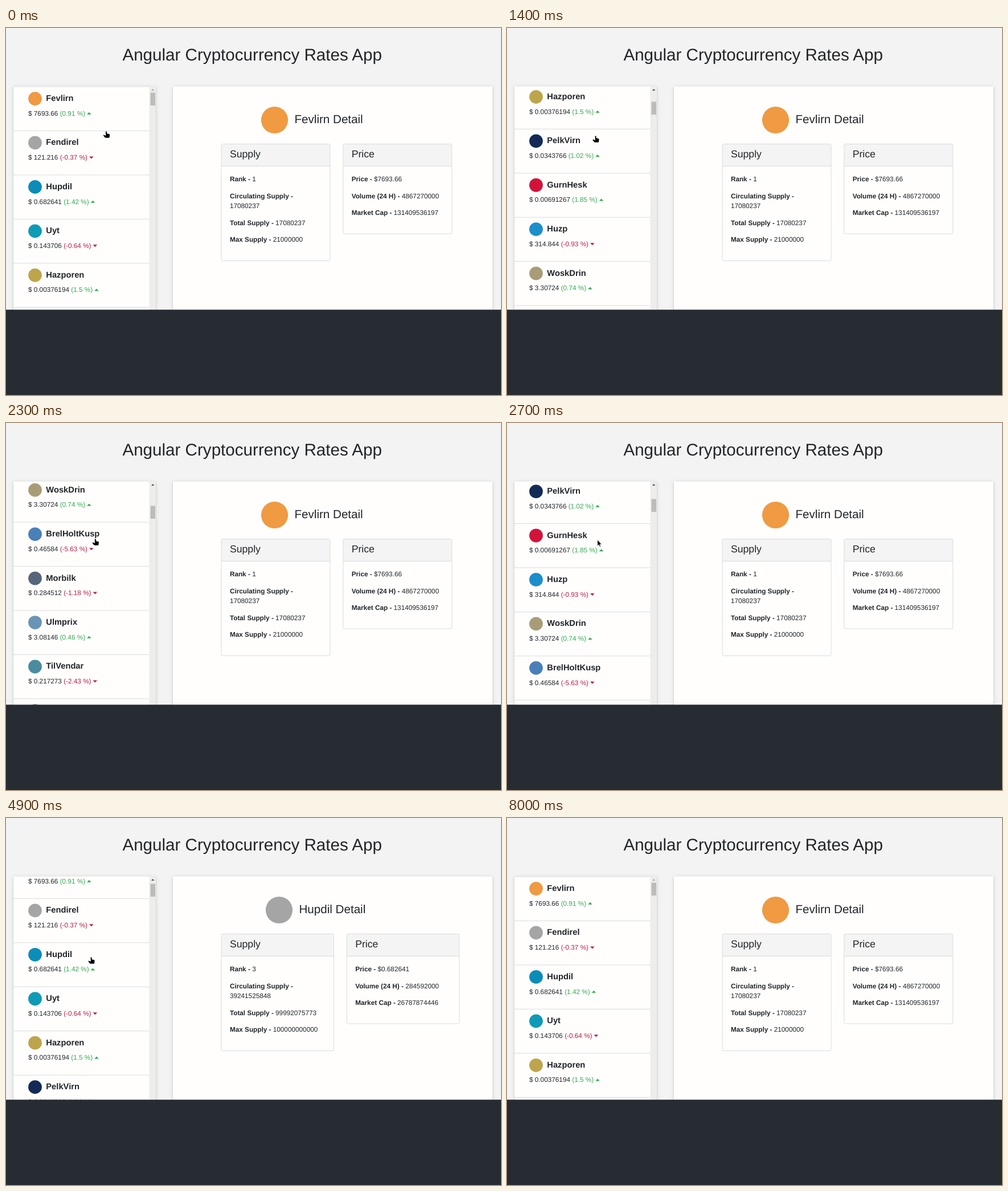
Recreate the animation shown at these times as an HTML page. Size 869 px wide and 644 px high, loop 8600 ms.

```html
<!DOCTYPE html>
<html lang="en">
<head>
<meta charset="utf-8">
<title>Cryptocurrency Rates</title>
<style>
  html, body { margin: 0; width: 100%; height: 100%; overflow: hidden; background: #f4f3f3; }
  svg { display: block; width: 869px; height: 644px; }
  text {
    font: 11.776px "Liberation Sans", Arial, sans-serif;
    fill: #212529; white-space: pre; text-rendering: geometricPrecision;
  }
  text.title { font-size: 29.6px; }
  text.heading { font-size: 20.6px; }
  text.card { font-size: 17.66px; }
  text.name { font-size: 14.72px; font-weight: bold; }
  .bold { font-weight: bold; }
  .up { fill: #32ab50; }
  .down { fill: #b81d47; }
  .panel {
    fill: #fffefd;
    filter: drop-shadow(0 1.5px 1.8px rgba(0, 0, 0, .15)) drop-shadow(0 1.5px 3.6px rgba(0, 0, 0, .1));
  }
  .line { stroke: #dcdcdc; fill: none; }
</style>
</head>
<body>
<svg id="stage" viewBox="0 0 869 644">
  <clipPath id="listClip"><rect x="13" y="102.5" width="250" height="392"/></clipPath>
  <rect width="869" height="644" fill="#f4f3f3"/>
  <text class="title" x="204.4" y="56.8">Angular Cryptocurrency Rates App</text>
  <rect class="panel" x="13" y="102.5" width="250" height="420"/>
  <rect class="panel" x="293" y="102.5" width="561" height="420"/>
  <g clip-path="url(#listClip)">
    <g id="list"></g>
    <rect x="251.5" y="102" width="12" height="393" fill="#ededec"/>
    <path id="scrollArrow" d="M255 109.8l2.7-2.9 2.7 2.9z"/>
    <rect id="thumb" x="253.5" width="8.5" height="22.5" fill="#bcbcba"/>
  </g>
  <g id="detail"></g>
  <rect y="494.3" width="869" height="150" fill="#272c33"/>
  <g id="cursor" stroke="#fff" stroke-width=".7" stroke-linejoin="round">
    <path id="hand" d="M-1.3 1Q-1.2 0 0 0T1.3 1L1.7 4 5.4 4.8Q6.6 5.2 6.4 7L5.8 12H-2L-5.2 8Q-6 6.2-4.4 6.3L-1 7.4Z"/>
    <path id="arrow" d="M2 2V12.8L4.4 10.6 6 14.2 7.8 13.4 6.2 9.9H9.4Z"/>
  </g>
</svg>
<script>
const LOOP = 8600, TICK = 100, ROW = 77.45, NOTCH = 39.12;

// name, price, change in percent, icon colour
const coins = [
  ['Fevlirn', '7693.66', 0.91, '#f09a42'],
  ['Fendirel', '121.216', -0.37, '#a5a5a5'],
  ['Hupdil', '0.682641', 1.42, '#0b8db8'],
  ['Uyt', '0.143706', -0.64, '#0f9ab5'],
  ['Hazporen', '0.00376194', 1.5, '#bda54c'],
  ['PelkVirn', '0.0343766', 1.02, '#122a55'],
  ['GurnHesk', '0.00691267', 1.85, '#d3123a'],
  ['Huzp', '314.844', -0.93, '#1c8ecb'],
  ['WoskDrin', '3.30724', 0.74, '#a89c78'],
  ['BrelHoltKusp', '0.46584', -5.63, '#4a80b8'],
  ['Morbilk', '0.284512', -1.18, '#56657a'],
  ['Ulmprix', '3.08146', 0.46, '#6a94b4'],
  ['TilVendar', '0.217273', -2.43, '#4a8c9e'],
  ['Zelvirt', '0.300028', 2.67, '#8c9290'],
  ['Kasbrin', '0.330295', -1.35, '#2a80b5'],
  ['Zonre', '0.0388709', -0.57, '#1a9fba'],
  ['Duvos', '2.44907', -6.72, '#5a9fd4'],
  ['Pobrisk', '1.52318', -2.04, '#2bab78']
];

// icon centre x and card width, then the figures shown in the cards
const details = [
  { iconX: 471.5, width: 191, rank: 1, supply: '17080237', total: '17080237', max: '21000000', volume: '4867270000', cap: '131409536197' },
  { iconX: 463.5, width: 187, rank: 6, supply: '56838817', total: '56838817', max: '84000000', volume: '301255000', cap: '6889774042' },
  { iconX: 479.5, width: 197.5, rank: 3, supply: '39241525848', total: '99992075773', max: '100000000000', volume: '284592000', cap: '26787874446' },
  { iconX: 480.5, width: 184, rank: 97, supply: '998999942', total: '998999942', max: '1000000000', volume: '5316140', cap: '143562286' }
];

// time followed by values
const scrollKeys = [[400, 0], [1000, 4], [1200, 7], [1300, 7], [1500, 9], [1600, 9], [1900, 24],
  [2500, 12], [2700, 10], [2800, 10], [3300, 1], [6100, 1], [6300, .28], [6400, 0]];
const cursorKeys = [[400, 176, 181], [1000, 155.5, 189], [1600, 155.5, 189], [1900, 156.8, 203],
  [2800, 156.8, 203], [3300, 152, 183], [3400, 152, 183], [3800, 130, 168], [4000, 131, 169],
  [4400, 151, 239], [4500, 151, 239], [4700, 149.5, 244], [5000, 149.5, 244], [5300, 139, 338],
  [5600, 139, 338], [6300, 139.5, 204.5], [6400, 135.5, 190], [6700, 111.5, 139],
  [7000, 111.5, 139], [7800, 92, 41], [7900, 71, 24]];
const selectionKeys = [[0, 0], [4000, 1], [4900, 2], [5600, 3], [7000, 0]];
const ICON_DELAY = 200;

const byId = id => document.getElementById(id);

function add(parent, tag, attributes, content = '') {
  const node = document.createElementNS('http://www.w3.org/2000/svg', tag);
  for (const key in attributes) node.setAttribute(key, attributes[key]);
  node.textContent = content;
  return parent.appendChild(node);
}

const addText = (parent, x, y, content, className = '') =>
  add(parent, 'text', { x, y, class: className }, content);

function addRow([name, price, change, color], index) {
  const row = add(byId('list'), 'g', { transform: `translate(0 ${index * ROW})` });
  const trend = change > 0 ? 'up' : 'down';
  add(row, 'path', { d: 'M13 103H251.5', class: 'line' });
  add(row, 'circle', { cx: 51, cy: 124, r: 11.9, fill: color });
  addText(row, 70.3, 128, name, 'name');
  const line = addText(row, 39, 153.7, `$ ${price} `);
  add(line, 'tspan', { class: trend }, `(${change} %)`);
  const x = 39 + line.getComputedTextLength() + 3;
  const shape = change > 0 ? `M${x} 151.8h7.6l-3.8-4z` : `M${x} 148h7.6l-3.8 4z`;
  add(row, 'path', { d: shape, class: trend });
}

function addCard(parent, x, width, bottom, title, lines) {
  const textX = x + 14.9;
  add(parent, 'rect', { x, y: 203.5, width, height: 39, rx: 2.5, fill: '#f5f4f4' });
  add(parent, 'rect', { x, y: 203.5, width, height: bottom - 203.5, rx: 2.5, class: 'line' });
  add(parent, 'path', { d: `M${x} 242.5h${width}`, class: 'line' });
  addText(parent, textX, 227.3, title, 'card');
  for (const [y, label, value] of lines) {
    const line = addText(parent, textX, y, '');
    add(line, 'tspan', { class: 'bold' }, label && `${label} - `);
    add(line, 'tspan', {}, value);
  }
}

function addDetail(item, index) {
  const group = add(byId('detail'), 'g', {});
  const [name, price] = coins[index];
  const { iconX, width } = item;
  const icon = add(group, 'circle', { cx: iconX, cy: 161.5, r: 23.6 });
  addText(group, iconX + 35, 166.8, `${name} Detail`, 'heading');
  addCard(group, 378, width, 408.5, 'Supply', [
    [269.4, 'Rank', item.rank],
    [298.8, 'Circulating Supply', ''],
    [316.4, '', item.supply],
    [345.9, 'Total Supply', item.total],
    [375.3, 'Max Supply', item.max]
  ]);
  addCard(group, 378 + width + 22.8, width, 361, 'Price', [
    [269.4, 'Price', '$' + price],
    [298.8, 'Volume (24 H)', item.volume],
    [328.3, 'Market Cap', item.cap]
  ]);
  return { group, icon };
}

function interpolate(keys, time) {
  const next = keys.findIndex(key => key[0] > time);
  if (next === 0) return keys[0].slice(1);
  if (next < 0) return keys[keys.length - 1].slice(1);
  const from = keys[next - 1], to = keys[next];
  const part = (time - from[0]) / (to[0] - from[0]);
  return from.slice(1).map((value, i) => value + (to[i + 1] - value) * part);
}

const selectedAt = time => selectionKeys.filter(key => key[0] <= Math.max(time, 0)).pop()[1];

const show = (node, visible) => node.setAttribute('visibility', visible ? 'visible' : 'hidden');

coins.forEach(addRow);
const views = details.map(addDetail);

function draw(time) {
  const scroll = interpolate(scrollKeys, time)[0] * NOTCH;
  byId('list').setAttribute('transform', `translate(0 ${-scroll})`);
  byId('thumb').setAttribute('y', 113.5 + scroll * .051);
  byId('scrollArrow').setAttribute('fill', scroll ? '#404040' : '#a3a3a3');

  const selected = selectedAt(time);
  views.forEach(({ group }, i) => group.setAttribute('display', i === selected ? 'inline' : 'none'));
  views[selected].icon.setAttribute('fill', coins[selectedAt(time - ICON_DELAY)][3]);

  const [x, y] = interpolate(cursorKeys, time);
  const betweenRows = time >= 100 && time < 500 || time >= 2600 && time < 2900;
  const isArrow = betweenRows || y < 101;
  const present = time < 8000;
  byId('cursor').setAttribute('transform', `translate(${x} ${y})`);
  show(byId('hand'), present && !isArrow);
  show(byId('arrow'), present && isArrow);
}

const start = performance.now();
function frame() {
  const elapsed = (performance.now() - start) % LOOP;
  draw(Math.floor(elapsed / TICK) * TICK);
  requestAnimationFrame(frame);
}
frame();
</script>
</body>
</html>
```
